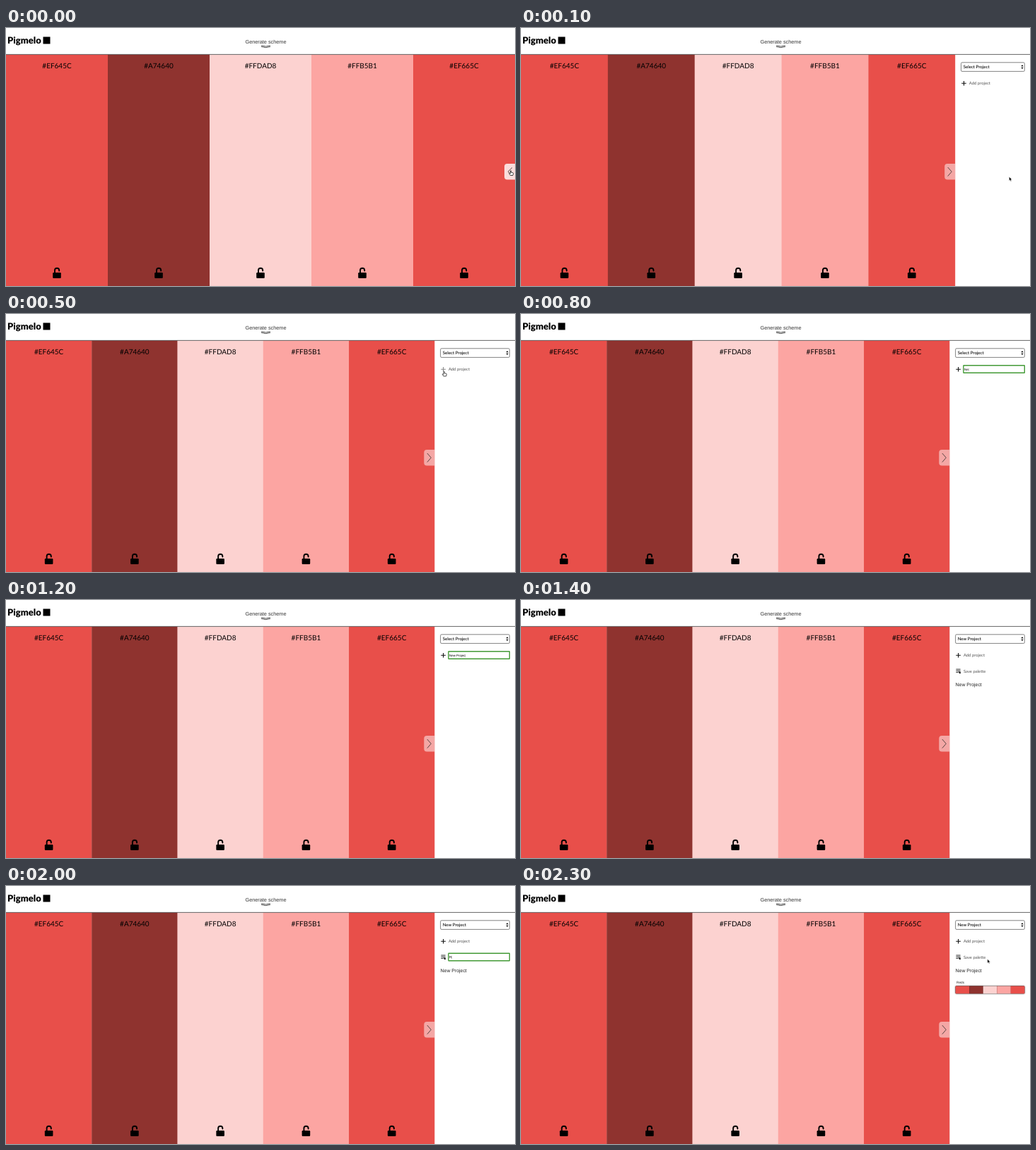
Write an HTML page that moves like this. It is 720 by 365 pixels and loops after 2.4 s.

```html
<!DOCTYPE html>
<html lang="en">
<head>
<meta charset="utf-8">
<title>Colour scheme maker</title>
<style>
  html, body { margin: 0; width: 100%; height: 100%; overflow: hidden; background: #fff; }
  svg { display: block; width: 720px; height: 365px; }
  text { font-family: Lato, sans-serif; text-rendering: geometricPrecision; }
  .arial { font-family: "Liberation Sans", Arial, sans-serif; }
</style>
</head>
<body>
<svg id="stage" viewBox="0 0 720 365">
  <defs>
    <g id="lock">
      <rect x="-5.8" y="346" width="11.6" height="8" rx="1.2"/>
      <path d="M-3 346.5V342.8A3.1 3.1 0 0 1 3.2 342.8V343.6" fill="none" stroke="#000" stroke-width="1.9" stroke-linecap="round"/>
    </g>
    <path id="arrow" d="M0 0V5.6L1.3 4.4L2.2 6.4L3.1 6L2.3 4.1H4Z" stroke="#fff" stroke-width=".4"/>
    <path id="hand" d="M-.6 .5Q0-.3 .6 .5V2.8L3.2 3.3Q3.8 3.5 3.7 4.2L3 7H-.6L-2.3 4.4Q-2.2 3.5-1.3 3.9L-.6 4.5Z" fill="#fff" stroke="#111" stroke-width=".75" stroke-linejoin="round"/>
  </defs>
  <g id="scene"></g>
</svg>
<script>
const LOOP = 2400, STEP = 100, RIGHT = 712.3;
const scene = document.getElementById("scene");
const swatches = [
  ["#EF645C", "#e84f4a"], ["#A74640", "#8f332f"], ["#FFDAD8", "#fcd2d0"],
  ["#FFB5B1", "#fca5a2"], ["#EF665C", "#e84f4a"]
];

const rect = (x, y, w, h, attrs) => `<rect x="${x}" y="${y}" width="${w}" height="${h}" ${attrs}/>`;
const line = (d, color, width) => `<path d="${d}" fill="none" stroke="${color}" stroke-width="${width}"/>`;
const text = (x, y, size, str, attrs = "") => `<text x="${x}" y="${y}" font-size="${size}" ${attrs}>${str}</text>`;
const use = (id, x, y) => `<use href="#${id}" x="${x}" y="${y}"/>`;
const clamp = v => Math.max(0, Math.min(1, v));
const mix = (a, b, k) => a + (b - a) * k;
const typed = (str, t, start, perStep) =>
  str.slice(0, Math.max(0, Math.floor((t - start) / STEP * perStep)));

function header() {
  return text(2, 21.8, 13, "Pigmelo", 'font-weight="900"')
    + rect(52.5, 12.5, 10, 10, "")
    + text(367.5, 22, 7.3, "Generate scheme", 'class="arial" text-anchor="middle" fill="#333"')
    + line("M361 24.8Q367.5 27.4 374 24.8M361 26.4Q367.5 29 374 26.4", "#555", 1);
}

function columns(edge) {
  const w = edge / swatches.length;
  return swatches.map(([name, color], i) => {
    const mid = (i + .5) * w;
    return rect(i * w, 37.5, w + (i < 4 ? .3 : 0), 327.5, `fill="${color}"`)
      + text(mid, 56.6, 10, name, 'text-anchor="middle"') + use("lock", mid, 0);
  }).join("");
}

function tab(edge, open) {
  const x = edge - 15;
  const d = open ? "M4.5 197L10 203.3L4.5 209.6" : "M11 197.5L5 203.3L11 209";
  return `<path d="M${edge} 192H${x + 4}Q${x} 192 ${x} 196V210.5Q${x} 214.5 ${x + 4} 214.5H${edge}Z" fill="#fff" fill-opacity="${open ? .5 : .8}"/>`
    + `<g transform="translate(${x})">${line(d, "#5c4644", 1)}</g>`;
}

function input(x, y, value) {
  const size = 4.4;
  return rect(x, y, RIGHT - x, 10.5, 'fill="#fff" stroke="#439a36" stroke-width="1.4" rx=".5"')
    + `<text class="arial" x="${x + 1.2}" y="${y + 6.8}" font-size="${size}">${value}<tspan fill="#333" dx="-.2">|</tspan></text>`;
}

function panel(left, t) {
  const x = left + 8.3, label = x + 11.3, saved = t >= 1400;
  const naming = t >= 600 && t < 1400;
  const titling = t >= 1800 && t < 2300;
  const plusColor = t >= 400 && t < 600 ? "#888" : "#111";
  const saveColor = t >= 1600 && t < 1800 ? "#777" : "#111";

  let out = rect(x, 48.8, RIGHT - x, 12.6, 'fill="#fff" stroke="#777" stroke-width=".9" rx="1.5"')
    + text(x + 3.2, 57.1, 6.1, saved ? "New Project" : "Select Project", 'font-weight="500"')
    + '<path d="M707.4 54.3L709 51.9L710.6 54.3ZM707.4 55.7L709 58.1L710.6 55.7Z"/>'
    + line(`M${x + .7} 78.2h6.6m-3.3-3.3v6.6`, plusColor, 1.1);

  out += naming
    ? input(label, 72.8, typed("New Project", t, 700, 2))
    : text(label, 80.1, 5.9, "Add project", 'fill="#555"');
  if (!saved) return out;

  out += line(`M${x + .8} 98h6.2M${x + .8} 100.2h6.2M${x + .8} 102.4h3.2`, saveColor, .9)
    + `<path d="M${x + 4} 101.5h3.2v2.5h-1.6Z" fill="${saveColor}"/>`
    + (titling
      ? input(label, 95.2, typed("Reds", t, 1900, 1.5))
      : text(label, 102.6, 5.9, "Save palette", 'fill="#555"'))
    + text(x, 121.8, 6.9, "New Project", 'class="arial" fill="#222"');

  if (t >= 2300) {
    const w = (RIGHT - x) / swatches.length;
    out += text(x + 1.5, 138, 4.7, "Reds", 'class="arial" fill="#222"')
      + rect(x, 141.5, RIGHT - x, 10.8, 'rx="1" style="filter:drop-shadow(0 .8px 1px #0008)"')
      + swatches.map(([, color], i) => rect(x + i * w, 141.5, w + .1, 10.8, `fill="${color}" rx=".5"`)).join("");
  }
  return out;
}

function cursor(t) {
  if (t < 100) return use("hand", 714, 201.5);
  if (t < 700) {
    const k = clamp((t - 100) / 400), ease = k * k * (3 - 2 * k);
    return use(t < 400 ? "arrow" : "hand", mix(690.5, 619.6, ease), mix(210.5, 81, ease));
  }
  if (t >= 1500 && t < 1800) {
    return use("hand", 619, mix(90, 98.2, clamp((t - 1500) / 100)));
  }
  return t >= 2300 ? use("arrow", 659.8, 103.4) : "";
}

function draw(t) {
  const open = t >= 100;
  const edge = !open ? 720 : t < 200 ? 614.2 : 606.3;
  scene.innerHTML = header() + columns(edge) + tab(edge, open)
    + (open ? panel(edge, t) : "")
    + line("M0 37.4H720", "#555", .9) + cursor(t);
}

let last = -1;
const begin = performance.now();
function tick(now) {
  const t = Math.floor(Math.max(0, now - begin) % LOOP / STEP) * STEP;
  if (t !== last) draw(last = t);
  requestAnimationFrame(tick);
}
tick(begin);
</script>
</body>
</html>
```
